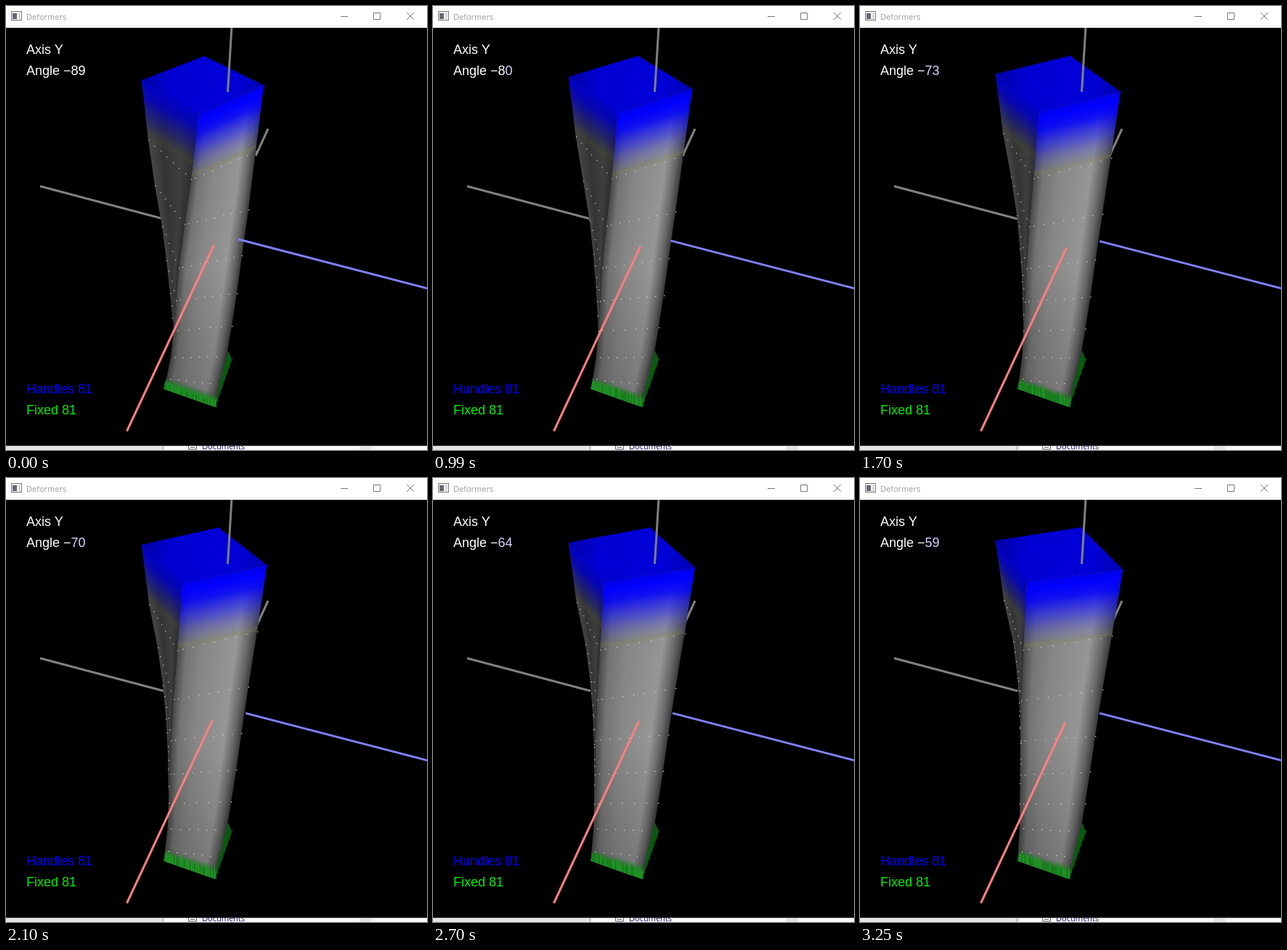
An HTML page with a canvas that plays this animation: 580 by 611 pixels, repeating every 3330 ms.

```html
<!DOCTYPE html>
<html lang="en">
<head>
<meta charset="utf-8">
<title>Deformers</title>
<style>
  html, body { margin: 0; width: 580px; height: 611px; overflow: hidden; background: #000; }
  canvas, svg { position: absolute; left: 0; top: 0; display: block; }
  .hud { font: 18px "Liberation Sans", Arial, sans-serif; fill: #fff; }
  .ui { font: 11px "Open Sans", "Noto Sans", sans-serif; }
  .fresh { fill: #d4d4ff; }
</style>
</head>
<body>
<canvas id="stage" width="580" height="611"></canvas>
<svg width="580" height="611" viewBox="0 0 580 611">
  <rect width="580" height="30" fill="#fff"/>
  <rect x="7.5" y="7.5" width="14" height="12" fill="#f4f4f4" stroke="#777"/>
  <rect x="9" y="10" width="6" height="8" fill="#667"/>
  <path d="M17 11h3M17 14h3M17 17h3" stroke="#aaa"/>
  <text class="ui" x="28" y="19" fill="#999">Deformers</text>
  <path d="M461 14.5h10M506.5 9.5h9v9h-9zM552 9l10 10M562 9l-10 10" fill="none" stroke="#777"/>
  <g class="hud">
    <text x="28" y="66">Axis Y</text>
    <text x="28" y="95">Angle −<tspan id="tens">8</tspan><tspan id="ones">9</tspan></text>
    <text x="28" y="533" style="fill:#00f">Handles 81</text>
    <text x="28" y="562" style="fill:#00f000">Fixed 81</text>
  </g>
  <svg y="605" width="580" height="6" viewBox="0 605 580 6">
    <rect y="605" width="580" height="6" fill="#f7f7f7"/>
    <rect y="605" width="216" height="6" fill="#e6e6e6"/>
    <rect x="487" y="605" width="16" height="6" fill="#e4e4e4"/>
    <rect y="605" width="580" height="1" fill="#b4b4b4"/>
    <path d="M216.5 605v6" stroke="#999"/>
    <path d="M251.5 605v5h11v-5M254 607.5h6" fill="none" stroke="#667"/>
    <text class="ui" x="270" y="610" fill="#1a1a70">Documents</text>
  </svg>
</svg>
<script>
const LOOP = 3330;
const STEPS = [150, 230, 300, 450, 530, 610, 760, 840, 990, 1080, 1230, 1320, 1400, 1550, 1630,
  1700, 1870, 1930, 2100, 2180, 2240, 2420, 2490, 2550, 2700, 2790, 2930, 3020, 3160, 3250];

// Edges of the twisted column, top to bottom, at the first and last angle.
const FRONT = [
  [266,148, 255,238, 246,300, 238,360, 234,405, 231,446, 227,483, 221,513, 217,527],
  [230,142, 225,236, 222,306, 221,361, 221,408, 220,448, 220,482, 218,513, 217,527]];
const RIGHT = [
  [355,109, 344,200, 334,280, 325,343, 318,395, 311,440, 304,482, 296,520, 288,552],
  [362,126, 347,217, 334,291, 324,355, 317,404, 310,448, 304,486, 297,522, 288,552]];
const LEFT = [
  [187,102, 196,184, 205,247, 215,303, 221,350, 226,395, 231,446],
  [187,86, 198,168, 211,225, 217,275, 220,320, 221,365, 220,448]];
const BACK = [[273,69], [304,68]];

const g = document.getElementById('stage').getContext('2d');
const tens = document.getElementById('tens');
const ones = document.getElementById('ones');

const mix = (a, b, t) => a + (b - a) * t;
const mixPt = (p, q, t) => [mix(p[0], q[0], t), mix(p[1], q[1], t)];
const grey = v => `rgb(${v},${v},${v})`;

function edge([a, b], t) {
  const pts = [];
  for (let i = 0; i < a.length; i += 2) pts.push([mix(a[i], b[i], t), mix(a[i + 1], b[i + 1], t)]);
  return pts;
}

function xAt(pts, y) {
  if (y <= pts[0][1]) return pts[0][0];
  for (let i = 1; i < pts.length; i++) {
    const [p, q] = [pts[i - 1], pts[i]];
    if (y <= q[1]) return mix(p[0], q[0], (y - p[1]) / (q[1] - p[1]));
  }
  return pts[pts.length - 1][0];
}

function trace(pts) {
  g.beginPath();
  pts.forEach(p => g.lineTo(...p));
  g.closePath();
}

function line(x1, y1, x2, y2, color) {
  g.strokeStyle = color;
  g.lineWidth = 3;
  g.beginPath();
  g.moveTo(x1, y1);
  g.lineTo(x2, y2);
  g.stroke();
}

function ramp(p, q, stops) {
  const r = g.createLinearGradient(...p, ...q);
  stops.forEach(([at, color]) => r.addColorStop(at, color));
  return r;
}

// Fills the outline row by row, shaded from one edge to the other.
function shade(outline, a, b, stops) {
  g.save();
  trace(outline);
  g.clip();
  const top = Math.floor(Math.min(a[0][1], b[0][1]));
  for (let y = top; y < 554; y++) {
    const x1 = xAt(a, y), x2 = Math.max(x1 + 1, xAt(b, y));
    g.fillStyle = ramp([x1, 0], [x2, 0], stops);
    g.fillRect(x1 - 2, y, x2 - x1 + 4, 1);
  }
  g.restore();
}

// Fades colour away from the side p-q, over the depth reached at "far".
function fade(outline, p, q, far, stops) {
  const len = Math.hypot(q[0] - p[0], q[1] - p[1]);
  const n = [(p[1] - q[1]) / len, (q[0] - p[0]) / len];
  const d = (far[0] - p[0]) * n[0] + (far[1] - p[1]) * n[1];
  g.fillStyle = ramp(p, [p[0] + n[0] * d, p[1] + n[1] * d], stops);
  trace(outline);
  g.fill();
}

function dots(p, q, count, color) {
  g.fillStyle = color;
  for (let i = 0; i < count; i++) {
    const [x, y] = mixPt(p, q, i / (count - 1));
    g.fillRect(Math.round(x), Math.round(y), 1.3, 1.3);
  }
}

function topFace(left, back, right, front) {
  trace([left, back, right, front]);
  g.fillStyle = ramp(left, right, [[0, 'rgb(0,0,165)'], [.25, 'rgb(0,0,212)'],
    [.75, 'rgb(0,0,216)'], [1, 'rgb(0,0,180)']]);
  g.fill();
  for (let i = 0; i < 9; i++) {
    const rim = i % 8 === 0;
    const a = mixPt(left, front, i / 8), b = mixPt(back, right, i / 8);
    dots(a, b, 9, rim ? '#0000f0' : 'rgba(0,0,160,.6)');
    dots(a, b, 2, '#0000f0');
  }
}

function greenBase(k) {
  trace([[306, 474], [311, 487], [288, 552], [293, 525]]);
  g.fillStyle = 'rgb(6,92,14)';
  g.fill();
  const p = [217, 527], q = [288, 552];
  fade([p, [221, 510], [296, 522], q], p, q, [222, 510],
    [[0, 'rgb(28,140,34)'], [.5, 'rgba(28,138,34,.95)'], [.8, 'rgba(30,110,34,.35)'], [1, 'rgba(40,90,40,0)']]);
  let seed = 17 + k * 31;
  for (let x = 217; x < 290; x += 2) {
    seed = (seed * 16807) % 2147483647;
    const r = seed / 2147483647, y = 527 + (x - 217) * .352;
    const h = k ? 7 + r * 9 + (x - 217) * .06 : 7;
    g.fillStyle = r > .5 ? 'rgba(34,150,38,.8)' : 'rgba(16,105,22,.7)';
    g.fillRect(x + (x < 221 ? 1 : 0), y - h, 1, h);
  }
  dots([311, 486], [288, 551], 8, '#0a6414');
}

function column(k) {
  const t = k / 30;
  const front = edge(FRONT, t), right = edge(RIGHT, t), left = edge(LEFT, t);
  const back = mixPt(...BACK, t);

  const side = [...left, ...front.slice(0, 6).reverse()];
  shade(side, left, front, [[0, grey(70)], [.3, grey(52)], [.7, grey(62)], [1, grey(46)]]);
  fade([left[0], left[1], front[1], front[0]], left[0], front[0], left[1],
    [[0, 'rgb(0,0,200)'], [.3, 'rgba(0,0,190,.85)'], [.65, 'rgba(10,10,150,.45)'],
     [.93, 'rgba(70,70,50,.4)'], [1, 'rgba(70,70,40,0)']]);

  const face = [...front, ...[...right].reverse()];
  shade(face, front, right, [[0, grey(70)], [.12, grey(116)], [.35, grey(135)],
    [.6, grey(144)], [.76, grey(150)], [.9, grey(104)], [1, grey(58)]]);
  trace(face);
  g.fillStyle = ramp([0, 360], [0, 540], [[0, 'rgba(0,0,0,0)'], [1, 'rgba(0,0,0,.2)']]);
  g.fill();
  fade([front[0], front[1], right[1], right[0]], front[0], right[0], front[1],
    [[0, 'rgb(0,0,232)'], [.12, 'rgba(0,0,255,1)'], [.3, 'rgba(0,0,255,.88)'], [.6, 'rgba(30,30,250,.5)'],
     [.85, 'rgba(80,80,200,.2)'], [.94, 'rgba(128,128,90,.35)'], [1, 'rgba(128,128,90,0)']]);

  greenBase(k);
  topFace(left[0], back, right[0], front[0]);

  for (let i = 1; i < 8; i++) {
    dots(mixPt(front[i], right[i], .06), mixPt(front[i], right[i], i < 6 ? 1 : .8), i < 5 ? 8 : 6, '#d2d2d2');
    if (i < 6) dots(left[i], front[i], 9 - i, '#c4c4b4');
  }
}

function draw(k) {
  const t = k / 30;
  g.fillStyle = '#000';
  g.fillRect(0, 0, 580, 611);
  line(47, 248, 217, 293, '#808080');
  line(361, 169, 344, 206, '#808080');
  column(k);
  line(311, 28, 305.5, 118, '#808080');
  const bx = Math.min(330, 320 + k * .8);
  line(bx, 321 + (bx - 320) * .259, 582, 389, '#8080ff');
  line(mix(286.5, 283, t), mix(329, 336, t), 166.5, 585, '#ff8080');

  const angle = 89 - k;
  tens.textContent = Math.floor(angle / 10);
  ones.textContent = angle % 10;
  tens.setAttribute('class', k > 9 ? 'fresh' : '');
  ones.setAttribute('class', k > 0 ? 'fresh' : '');
}

const start = performance.now();
let shown = -1;
function tick() {
  const ms = (performance.now() - start) % LOOP;
  const k = STEPS.filter(s => s <= ms).length;
  if (k !== shown) draw(shown = k);
  requestAnimationFrame(tick);
}
tick();
</script>
</body>
</html>
```
